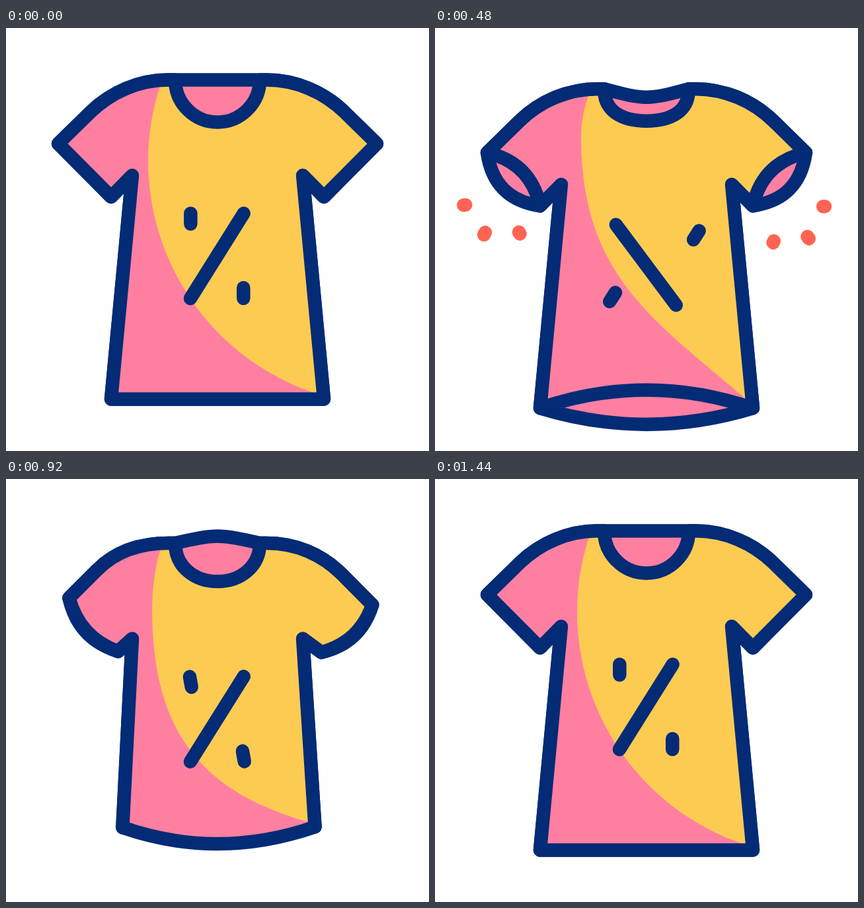
These frames come from a looping animation (640x640 px, 1480 ms). An HTML page:

```html
<!DOCTYPE html>
<html lang="en">
<head>
<meta charset="utf-8">
<title>T-shirt</title>
<style>
html, body { margin: 0; width: 100%; height: 100%; overflow: hidden; background: #fff; }
svg { display: block; width: 100%; height: 100%; }
.line { fill: none; stroke: #042b76; stroke-width: 20.5; stroke-linecap: round; stroke-linejoin: round; }
.pink { fill: #ff7fa1; }
.spark { stroke: #ff6452; }
</style>
</head>
<body>
<svg viewBox="0 0 640 640">
  <defs><clipPath id="clip"><path id="mask"/></clipPath></defs>
  <path id="sparks" class="line spark"/>
  <g id="shirt">
    <path id="back" class="line pink"/>
    <path id="fill" class="pink"/>
    <g clip-path="url(#clip)"><path id="yellow" fill="#fdcb52"/></g>
    <path id="front" class="line"/>
    <path id="slash" class="line" d="M0-76V76"/>
    <path id="dotA" class="line" d="M0-8V8"/>
    <path id="dotB" class="line" d="M0-8V8"/>
  </g>
</svg>
<script>
const LOOP = 1480, STEP = 40;
const TOP = 78.5, CX = 319.3, CY = 344.8;
const $ = id => document.getElementById(id);
const clamp = p => Math.min(1, Math.max(0, p));
const linear = (t, a, b) => clamp((t - a) / (b - a));
const ease = (t, a, b) => {
  const p = linear(t, a, b);
  return p * p * (3 - 2 * p);
};
const polar = (x, y, r, deg) => {
  const a = deg * Math.PI / 180;
  return [x + r * Math.cos(a), y + r * Math.sin(a)];
};
const mirror = ([x, y]) => [640 - x, y];

// Key points; those of the right side are mirrored.
// bend, sag: curve of cuffs and hem, front then back. collar: depth of back, front.
// side, pull: leftmost point and lower handle of the yellow part.
const rest = {
  tipL: [79, 175], cuffL: [159, 255.5], hemL: [159, 561.5],
  tipR: [79, 175], cuffR: [159, 255.5], hemR: [159, 561.5],
  bend: [0, 0], sag: [0, 0], collar: [0, 64], side: [215, 200], pull: [323, 510]
};
const open = {
  ...rest,
  bend: [0.21, -0.25], sag: [-27.5, 24.5], collar: [12.5, 48.5], side: [221, 150], pull: [335, 430]
};
const tucked = {
  tipL: [96, 161], cuffL: [170, 242], hemL: [177, 507],
  tipR: [86, 172], cuffR: [163, 243.5], hemR: [173, 506],
  bend: [-0.19, -0.19], sag: [27, -11], collar: [-11.2, 58.5], side: [221, 178], pull: [295, 459]
};

function blend(o, k) {
  const out = {};
  for (const name in rest)
    out[name] = rest[name].map((r, i) => r + o * (open[name][i] - r) + k * (tucked[name][i] - r));
  return out;
}

// Points of one half, from the collar down to the hem
function half(tip, cuff, hem, bend) {
  const end = [127.5 + 0.65 * (tip[0] - 79), 127.5 + 0.65 * (tip[1] - 175)];
  const lead = end.map((v, i) => v + 0.65 * (v - tip[i]));
  const dx = cuff[0] - tip[0], dy = cuff[1] - tip[1];
  const bow = p => [tip[0] + dx * p + bend * dy, tip[1] + dy * p - bend * dx];
  return [[246, TOP], [201.5, TOP], lead, end, tip, bow(1 / 3), bow(2 / 3), cuff, [191, 223], hem];
}

// layer: 0 front, 1 back
function outline(pose, layer) {
  const bend = pose.bend[layer];
  const l = half(pose.tipL, pose.cuffL, pose.hemL, bend);
  const r = half(pose.tipR, pose.cuffR, pose.hemR, bend).map(mirror).reverse();
  const low = (pose.hemL[1] + pose.hemR[1]) / 2 + 2 * pose.sag[layer];
  const depth = pose.collar[1 - layer], base = TOP + depth;
  const c1 = layer ? [280, TOP + depth / 2] : [256, TOP + 35];
  const c2 = [layer ? 300 : 284.7, base];
  return `M${l[0]}C${l.slice(1, 4)}L${l[4]}C${l.slice(5, 8)}L${l[8]}L${l[9]}`
    + `Q320 ${low} ${r[0]}L${r[1]}L${r[2]}C${r.slice(3, 6)}L${r[6]}C${r.slice(7)}L384 ${TOP}`
    + `C${mirror(c1)} ${mirror(c2)} 320 ${base}C${c2} ${c1} 256 ${TOP}Z`;
}

function border({ side: [x, y], pull, hemR }) {
  const [ex, ey] = mirror(hemR);
  return `M236 ${TOP}Q${x} ${(TOP + y) / 2} ${x} ${y}C${x} 366 ${pull} ${ex} ${ey - 4.5}L640 ${ey}V60H236Z`;
}

function place(id, [x, y], angle) {
  $(id).setAttribute('transform', `translate(${x} ${y}) rotate(${angle})`);
}

function drawPercent(t) {
  const turn = -180 * ease(t, 160, 920);
  place('slash', [CX, CY], 32.1 + turn);

  // The dots circle a drifting centre while each spins once
  const p = linear(t, 120, 920), swell = Math.sin(Math.PI * p) ** 2;
  const x = CX + 13 * swell, y = CY + 6 * Math.sin(2 * Math.PI * p);
  const orbit = -125.4 - 90 * (ease(t, 120, 500) + ease(t, 440, 920));
  const spin = turn + 360 * ease(t, 200, 1000);
  place('dotA', polar(x, y, 69 + 10 * swell, orbit), spin);
  place('dotB', polar(x, y, 69 + 10 * swell, orbit + 180), spin);
}

// Three rays; the middle one starts closer in
function fan(x, y, first, step, head, tail) {
  let d = '';
  for (let i = 0; i < 3; i++) {
    const near = i === 1 ? 5 : 18;
    const at = p => polar(x, y, near + (57 - near) * p, first + step * i);
    d += `M${at(tail)}L${at(head)}`;
  }
  return d;
}

function draw(t) {
  const closing = ease(t, 600, 960);
  const pose = blend(ease(t, 80, 340) * (1 - closing), closing * (1 - ease(t, 1080, 1440)));
  const front = outline(pose, 0);
  for (const id of ['mask', 'fill', 'front']) $(id).setAttribute('d', front);
  $('back').setAttribute('d', outline(pose, 1));
  $('yellow').setAttribute('d', border(pose));

  const drop = 23 * (ease(t, 120, 760) - ease(t, 760, 1320));
  $('shirt').setAttribute('transform', `translate(0 ${drop})`);
  drawPercent(t);

  const head = ease(t, 200, 460), tail = ease(t, 280, 520);
  $('sparks').setAttribute('d', head > 0 && tail < 1
    ? fan(100, 262, 174, -57, head, tail) + fan(533, 272, -2, 57, head, tail) : '');
}

const start = performance.now();
function tick() {
  const t = (performance.now() - start) % LOOP;
  draw(Math.floor((t + 0.5) / STEP) * STEP % LOOP);
  requestAnimationFrame(tick);
}
tick();
</script>
</body>
</html>
```
